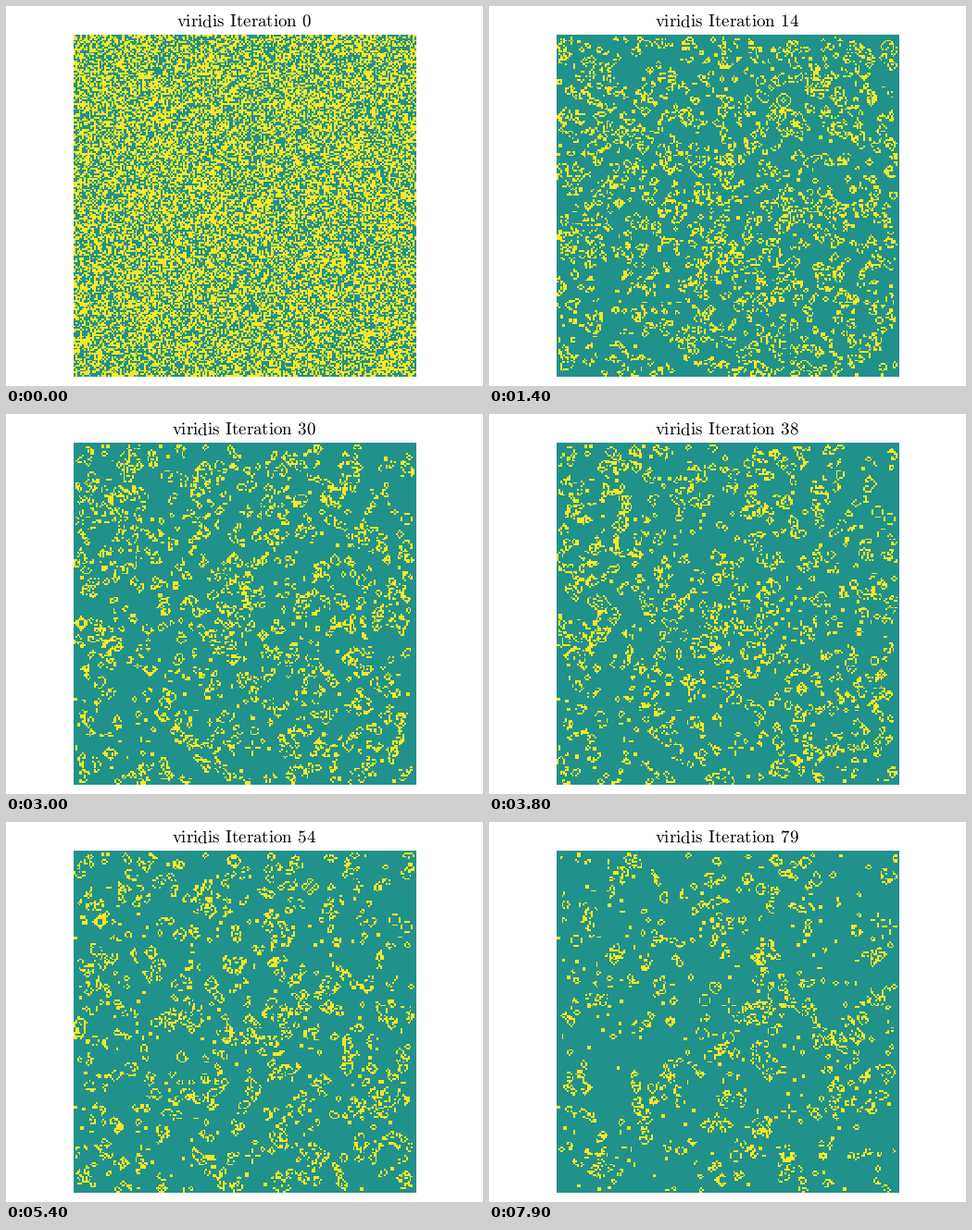
A matplotlib script for the animation above (8000 ms loop, 515 by 411 pixels).

```python
import numpy as np
import matplotlib.pyplot as plt
from matplotlib.animation import FuncAnimation
from matplotlib.colors import ListedColormap

W, H, DPI = 515, 411, 128
LEFT, BOTTOM, SIDE = 73, 10, 370
N, STEPS = 200, 80
FONT_PX = 18.95
DEAD, ALIVE = "#21918c", "#fde725"

plt.rcParams["mathtext.fontset"] = "cm"
plt.rcParams["text.hinting"] = "no_hinting"


def step(grid):
    """One Game of Life generation; the last row and column stay dead."""
    padded = np.pad(grid, 1)
    near = sum(
        padded[i:i + N, j:j + N]
        for i in range(3) for j in range(3) if (i, j) != (1, 1)
    )
    new = ((near == 3) | ((grid == 1) & (near == 2))).astype(int)
    new[-1, :] = new[:, -1] = 0
    return new


def label(k):
    gap = r"\hspace{0.38}"
    return rf"$\mathrm{{viridis}}{gap}\mathrm{{Iteration}}{gap}\mathrm{{{k}}}$"


rng = np.random.RandomState(42)
states = [rng.randint(0, 2, (N, N))]
while len(states) < STEPS:
    states.append(step(states[-1]))

fig = plt.figure(figsize=(W / DPI, H / DPI), dpi=DPI, facecolor="white")
ax = fig.add_axes([LEFT / W, BOTTOM / H, SIDE / W, SIDE / H])
ax.axis("off")
image = ax.imshow(states[0], cmap=ListedColormap([DEAD, ALIVE]), vmin=0, vmax=1,
                  origin="lower", interpolation="nearest", aspect="auto")
title = fig.text(257.3 / W, (H - 22.7) / H, label(0),
                 ha="center", va="baseline", color="black",
                 fontsize=FONT_PX * 72 / DPI)


def update(k):
    image.set_data(states[k])
    title.set_text(label(k))
    return image, title


anim = FuncAnimation(fig, update, frames=STEPS, interval=100,
                     repeat=True, repeat_delay=0)
plt.show()
```
